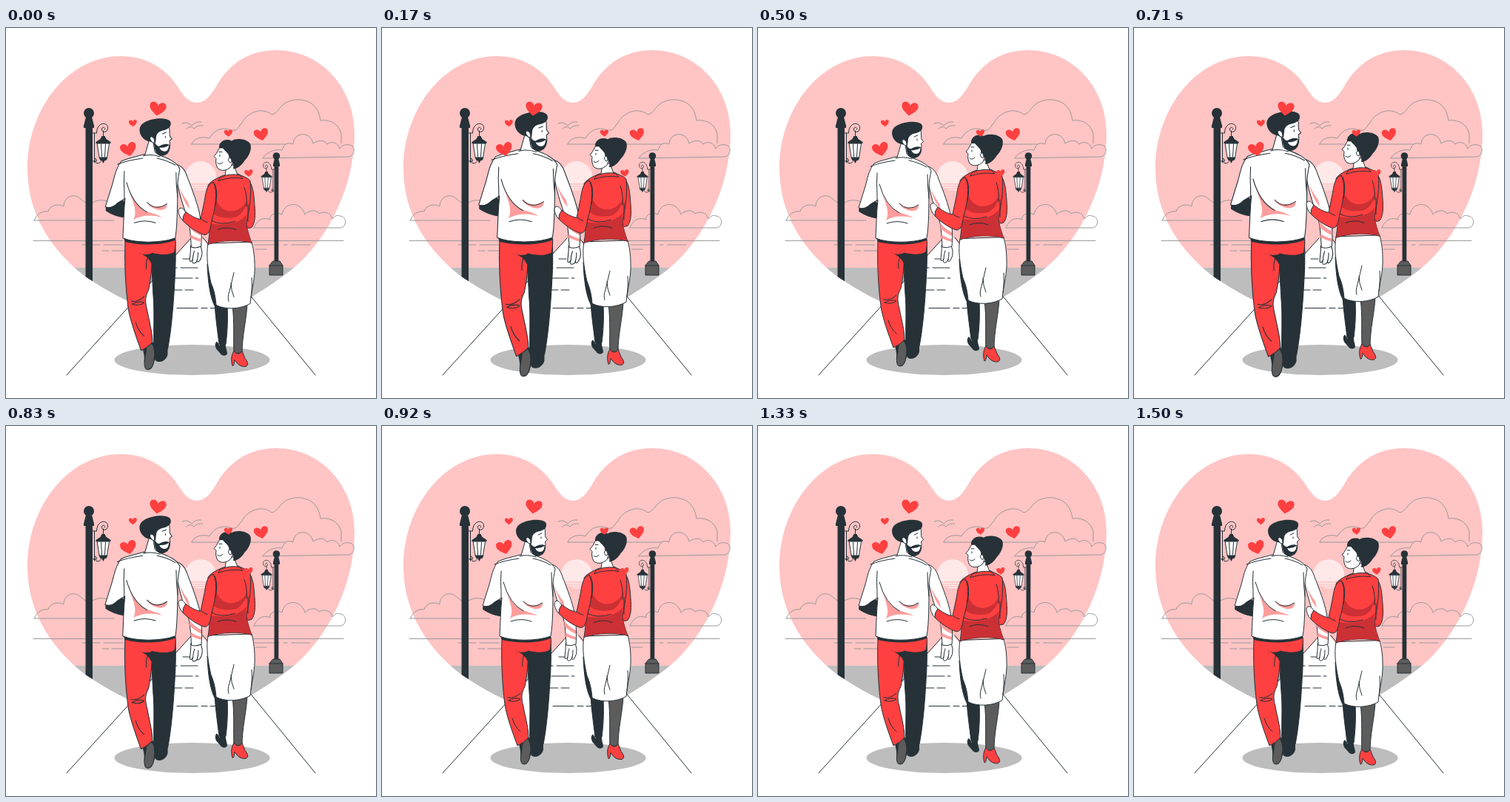
Recreate the animation shown at these times as an HTML page. Size 500 by 500 pixels, loop 1540 ms.

```html
<!DOCTYPE html>
<html lang="en">
<head>
<meta charset="utf-8">
<title>Evening walk</title>
<style>
html,body{margin:0;width:100%;height:100%;overflow:hidden;background:#fff}
svg{display:block;width:100vw;height:100vh}
path,line,circle,ellipse,rect{stroke-linecap:round;stroke-linejoin:round}
.ink{fill:#263238}
.red{fill:#ff4040}
.pink{fill:#ff9c9c}
.grey{fill:#bdbdbd}
.dim{fill:#5c5c5c}
.wine{fill:#cb3034}
.white{fill:#fff}
.o{stroke:#263238;stroke-width:1}
.l{fill:none;stroke:#263238;stroke-width:1}
.far{fill:none;stroke:#999;stroke-width:1}
</style>
</head>
<body>
<svg viewBox="0 0 500 500">
<defs>
  <path id="shape" d="M257 101C246 100 241 92 235 84C218 55 190 38 155 38C85 38 29 108 29 190C29 262 74 312 112 339C160 371 215 392 250 402C310 380 352 353 389 324C438 283 471 210 471 143C471 80 425 30 365 30C330 30 306 46 288 72C280 86 272 101 257 101Z"/>
  <clipPath id="clip"><use href="#shape"/></clipPath>
  <path id="heart" d="M0 9C-4 6-10.500 2-10.500-3.500C-10.500-9.500-2.500-10 0-4C2.500-10 10.500-9.500 10.500-3.500C10.500 2 4 6 0 9Z"/>
  <g id="lantern">
    <path class="l" d="M-14-17H-9C-9-32 6-33 6-24C6-17-3-17-2-23C-1-26 3-25 2-22M0-20V-12M-14 21H-9C-10 14-13 18-11 22C-8 26-3 23-2 19M-12-17V23" stroke-width="1.2"/>
    <path class="ink" d="M-2-13H2L4-9L10-5V-3H-10V-5L-4-9ZM-6 16H6L4 20H2L0 24L-2 20H-4Z"/>
    <path class="white o" d="M-8-3H8L5 16H-5Z" stroke-width="1.6"/>
    <path class="l" d="M-3-2L-2 15M3-2L2 15"/>
  </g>
</defs>

<use href="#shape" fill="#ffc4c4"/>
<g clip-path="url(#clip)">
  <rect class="grey" x="20" y="324" width="460" height="90"/>
</g>
<path d="M244 210A21 21 0 1 1 282 210Z" fill="#ffe8e8"/>
<path d="M247 212.500H279M251 215.500H273M257 218.500H269" fill="none" stroke="#ffe8e8" stroke-width="1.400"/>
<g class="far">
  <path d="M38 260H146M38 260C42 251 49 247 57 248C59 239 72 237 78 241C78 228 92 222 101 231C108 237 111 238 114 238C124 230 136 232 145 238"/>
  <path d="M251 157H378M251 157C254 149 264 146 275 149C281 138 292 133 304 138C313 140 314 133 319 128C328 112 347 107 359 117C365 116 368 110 373 105C383 95 402 94 414 103C422 109 424 119 425 125C440 123 451 132 453 143L453 156"/>
  <path d="M347 176L463 174C472 173 473 158 464 158C457 157 454 159 451 163C449 155 440 152 434 157C429 149 420 153 415 156C411 139 389 140 388 157C379 153 375 159 373 165C362 163 351 169 347 176Z"/>
  <path d="M335 270H452C461 269 461 254 451 254C446 252 444 255 441 258C439 249 430 247 423 251C419 244 408 247 404 252C398 233 376 235 373 252C363 247 355 254 357 259C346 254 338 262 335 270Z"/>
  <path d="M37 287.500H158M332 287.500H456M103 293H127M132 293H158M130 301H139M143 301H161M336 293H369M375 293H380M386 293H411M337 299H352"/>
  <path d="M238 129Q245 126 251 132Q256 126 264 127M244 136Q250 131 254 136Q259 131 266 132"/>
</g>

<path class="white" d="M258 276L82 469H418Z"/>
<path class="l" d="M82 469L250 284M418 469L266 283"/>
<path class="l" d="M239 312H249M227 324H231M236 324H259M229 338H252M256 338H260M225 354H238M242 354H253M231 378.500H259M264 378.500H272M276 378.500H287"/>

<g class="ink">
  <g clip-path="url(#clip)"><rect x="107.500" y="130" width="9.500" height="240"/></g>
  <circle cx="112" cy="115" r="7"/>
  <path d="M108 120H116L119 132V135H105V132Z"/>
  <rect x="362.500" y="182" width="5.800" height="136"/>
  <circle cx="365.400" cy="173" r="4.800"/>
  <path d="M363 176H368L370 184V187H361V184Z"/>
</g>
<path class="dim o" d="M361 315H370L374 321V334H356V321ZM356 321H374"/>
<use href="#lantern" transform="translate(131.500 159)"/>
<use href="#lantern" transform="translate(352 204) scale(-.74 .76)"/>
<ellipse class="grey" cx="251.500" cy="448.500" rx="105" ry="20.500"/>

<g id="man">
  <path class="ink" d="M202 425C200 434 199 444 203 446C209 449 217 444 218 437L218 427Z"/>
  <path class="ink o" d="M196 304L228 289C229 310 228 330 227 345C225 380 222 410 218 430C212 434 206 433 200 431C199 405 201 380 199 360Z"/>
  <path class="ink" d="M184 424C185 432 188 438 187 446C188 457 192 459 196 456C202 449 203 435 200 421Z"/>
  <path class="dim o" d="M194 422C201 422 202 436 200 444C199 454 195 457 191 457C186 456 187 444 189 437C190 429 190 424 194 422Z"/>
  <path class="red o" d="M162 287C180 292 211 291 228 285C229 291 228 297 227 303C217 308 206 306 197 304C198 320 196 337 193 352C188 362 188 367 191 379C194 395 198 408 198 421Q192 428 183 432C176 413 168 391 166 376C162 345 161 315 162 287Z"/>
  <path class="ink" d="M160 284C182 290 210 289 228 284L228 287C210 294 182 294 162 289Z"/>
  <path class="ink" d="M178 303Q187 308 198 304L197 318Q191 306 178 303Z"/>
  <path class="l" d="M192 309Q189 316 190 325M170 367Q179 369 187 361M171 371Q181 374 187 369Q180 366 171 371M176 395Q179 406 187 413"/>

  <path class="ink o" d="M137 244L153 229L162 238L161 257Q147 255 137 248Z"/>
  <path class="white o" d="M248 294C249 300 247 307 247 314Q249 316 251 312Q249 318 253 317Q256 317 257 312Q256 318 260 314Q264 308 263 301L261 293Z"/>
  <path class="l" d="M253 301Q251 307 251 312M258 303Q258 309 257 312" stroke-width=".8"/>
  <path class="white o" d="M226 186C237 188 241 195 244 204C251 222 257 238 260 252C263 270 263 284 262 295Q255 298 249 296C248 282 248 270 245 260C240 247 235 233 231 213Z"/>
  <path class="pink" d="M246 263Q253 272 262 276V281Q253 277 247 271ZM248 279Q255 284 262 285V289Q254 287 248 284ZM233 215Q237 227 245 237L247 246Q238 236 233 215Z"/>
  <path class="white o" d="M187 174C175 177 163 180 157 183C149 193 148 204 145 214L136 243Q144 246 152 238Q157 235 162 232C160 250 160 268 159 284C175 291 210 291 228 284C231 267 231 242 231 216C231 207 233 199 234 193C230 184 218 179 207 175Z"/>
  <path class="pink" d="M164 212C168 228 176 241 188 248C197 252 206 253 210 257C197 253 183 254 173 260C180 247 169 231 164 212ZM190 237C197 243 207 245 217 239C218 246 211 249 202 246Q194 243 190 237Z"/>
  <path class="l" d="M161 196Q160 211 161 224V239M152 187Q164 182 185 179M164 211Q172 240 191 250M174 264Q188 259 202 264M191 237Q202 249 217 239M229 198Q229 215 231 230M204 179Q218 182 228 188"/>
  <path class="white" d="M194 154L188 175Q197 178 207 176L203 164Z"/>
  <path class="l" d="M194 154L188 175M186 176Q196 173 208 177"/>
  <path class="white o" d="M199 146L220 138C221 143 220 147 221 150L223.500 153.500L220.500 156C221.500 162 221 169 217 173C211 176 204 175 201 170L199 158Z"/>
  <path class="ink" d="M200 157C203 162 205 165 209 162Q215 159 220 161C222 169 217 176 210 176C204 176 200 170 200 157Z"/>
  <path class="white" d="M207 165Q214 166 219.500 162Q219 170 214 170Q209 170 207 165Z"/>
  <path class="ink" d="M194 157C187 156 181 149 181 142C181 134 189 130 198 128C207 126 216 126 221 130C224 135 221 140 214 142C207 143 204 146 203 150L202 159L198 158Z"/>
  <path class="white o" d="M200 153C196 148 193 152 196 156Q198 160 201 158Z"/>
  <path class="l" d="M211 147L216 145M215 150V152"/>
</g>

<g id="woman">
  <path class="ink o" d="M282 372L299 376C300 395 299 413 297 428L288 428C286 410 283 392 282 372Z"/>
  <path class="ink" d="M288 421L297 425C296 432 299 436 299 441Q296 445 291 442L284 434Q281 427 285 424L289 430Z"/>
  <path class="dim o" d="M306 375L326 373C325 395 319 416 319 440L308 440C307 420 309 400 306 375Z"/>
  <path class="red o" d="M308 437C304 442 304 451 306 457Q308 458 309 449C312 454 317 459 324 458C329 456 326 451 323 447L319 437Q314 445 308 437Z"/>
  <path class="ink o" d="M272 320C273 345 276 366 283 378L288 375L278 330Z"/>
  <path class="white o" d="M273 292C270 308 273 327 277 345C281 354 283 363 284 375C297 382 318 380 330 373C332 353 337 338 336 320C336 308 334 297 332 290Z"/>
  <path class="l" d="M308 331Q305 344 302 356Q299 365 301 370M304 345Q304 355 308 364M331 365Q333 348 332 338"/>

  <path class="red o" d="M326 205C334 210 335 226 336 240C337 253 337 263 332 270Q326 273 321 267Z"/>
  <path class="red o" d="M293 200C286 203 277 207 273 213C275 236 278 262 273 293C291 287 316 286 332 291C328 280 325 270 325 263C329 246 332 224 330 207C326 202 319 201 314 198Z"/>
  <path class="wine" d="M276 265C290 267 302 266 312 262Q320 259 326 252Q322 262 326 272L331.500 290.500C316 286 291 287 273.500 292.500Q277 278 276 265ZM284 232Q290 249 306 248Q320 246 327 231Q323 250 311 256Q292 260 281 252Z"/>
  <path class="white o" d="M243 250C241 246 238 243 235 244C232 246 233 251 235 255Q237 261 243 262L250 256Z"/>
  <path class="red o" d="M280 209C271 211 270 224 268 235L263 259C256 258 248 253 243 249Q238 255 239 261C247 269 258 277 268 280C276 280 276 270 278 261C283 243 287 221 280 209Z"/>
  <path class="l" d="M282 211Q287 221 283 240M278 261Q291 268 309 262M286 273Q298 268 311 273M322 216Q326 226 325 242M264 259Q269 263 272 263M327 239V262"/>
  <path class="white o" d="M298 186L296 200Q304 204 313 199L308 186Z"/>
  <path class="red o" d="M290 202Q302 197 315 199L320 204Q304 201 287 207Z"/>
  <path class="white o" d="M290 160C286 166 286 169 281 174L284 177C283 182 284 186 286 190C291 195 299 193 304 188L309 175L301 161Z"/>
  <path class="ink" d="M288 163C287 154 297 149 305 153C311 149 325 150 330 157C333 164 328 174 323 179C318 187 312 191 307 191C308 187 307 183 305 181L301 177C303 171 297 168 293 163Z"/>
  <path class="white o" d="M304 177C301 174 299 179 302 182Q304 184 305 181Z"/>
  <path class="l" d="M288 168L292 168M289 172V174M286 183Q289 186 293 182"/>
</g>

<g class="red" id="hearts"></g>
</svg>
<script>
const SVG = 'http://www.w3.org/2000/svg';
const hearts = [[205, 109, 1.06, 8], [171.5, 128.5, .52, -5], [165.5, 164, 1.03, -14],
                [300.5, 142, .54, -5], [345, 144, .92, -12], [328, 196, .54, -8]];
for (const [x, y, s, r] of hearts) {
  const use = document.createElementNS(SVG, 'use');
  use.setAttribute('href', '#heart');
  use.setAttribute('transform', `translate(${x} ${y}) rotate(${r}) scale(${s})`);
  document.getElementById('hearts').append(use);
}

const LOOP = 1540, STEPS = 37;
const beat = [[0, 1], [.1, 1.1], [.3, 1], [.4, 1], [.5, 1.1], [.6, 1], [1, 1]];
const float = [[0, 0], [.5, -10], [1, 0]];
const man = document.getElementById('man');
const woman = document.getElementById('woman');

// Linear interpolation through a table of [progress, value].
function at(table, p) {
  const i = Math.max(1, table.findIndex(k => k[0] >= p));
  const [a, u] = table[i - 1], [b, v] = table[i];
  return u + (v - u) * (p - a) / (b - a);
}

const start = performance.now();
function draw(now) {
  const t = Math.max(0, now - start) % LOOP;
  const step = Math.min(STEPS - 1, Math.floor((t + 5) / LOOP * STEPS));
  const p = (step + 1) / STEPS;
  man.setAttribute('transform', `translate(200 292) scale(${at(beat, p)}) translate(-200 -292)`);
  woman.setAttribute('transform', `translate(0 ${at(float, p)})`);
  requestAnimationFrame(draw);
}
draw(start);
</script>
</body>
</html>
```
